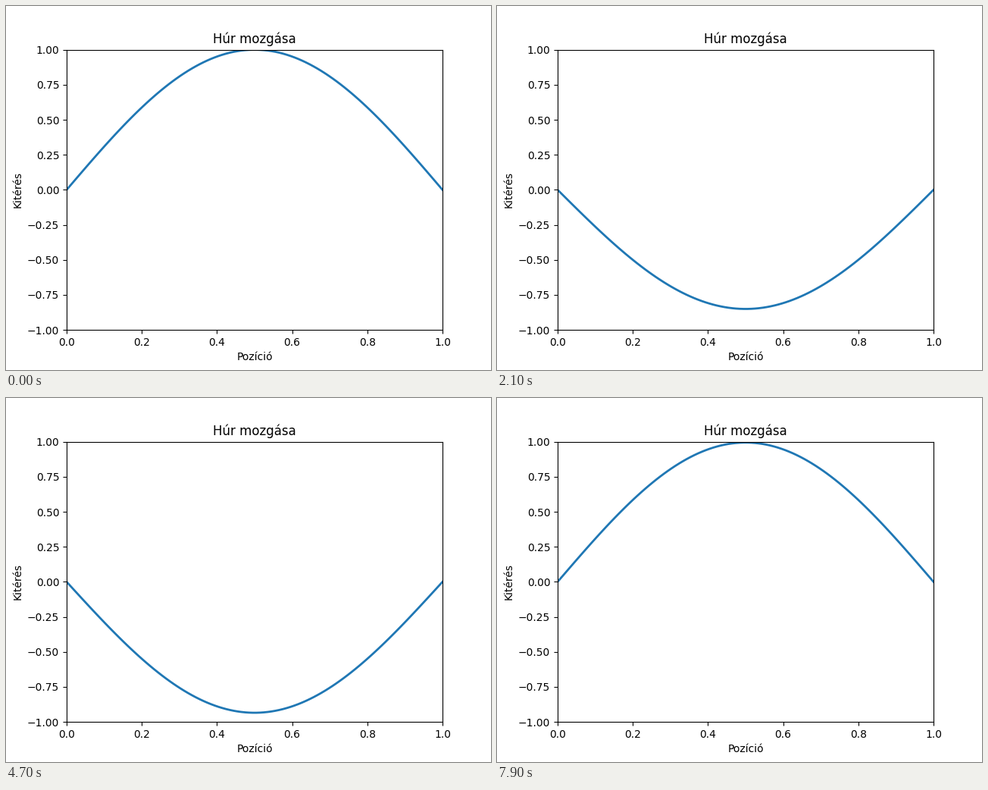
These frames come from a looping animation (640 px wide and 480 px high, 8 s). A matplotlib script:

```python
import matplotlib.pyplot as plt
import numpy as np
from matplotlib.animation import FuncAnimation

FRAMES = 80
INTERVAL = 100                      # ms
STEP = 2 * np.pi * 7.5 / 99         # phase advance per frame
PHASE = -0.0163

x = np.linspace(0, 1, 100)
mode = np.sin(np.pi * x)            # fundamental mode of the string

fig, ax = plt.subplots(figsize=(6.4, 4.8), dpi=100)
line, = ax.plot(x, mode, color="tab:blue", lw=2)
ax.set(xlim=(0, 1), ylim=(-1, 1), title="Húr mozgása",
       xlabel="Pozíció", ylabel="Kitérés")


def update(i):
    line.set_ydata(mode * np.cos(STEP * i + PHASE))
    return line,


anim = FuncAnimation(fig, update, frames=FRAMES, interval=INTERVAL,
                     repeat=True, repeat_delay=0, blit=False)
plt.show()
```
